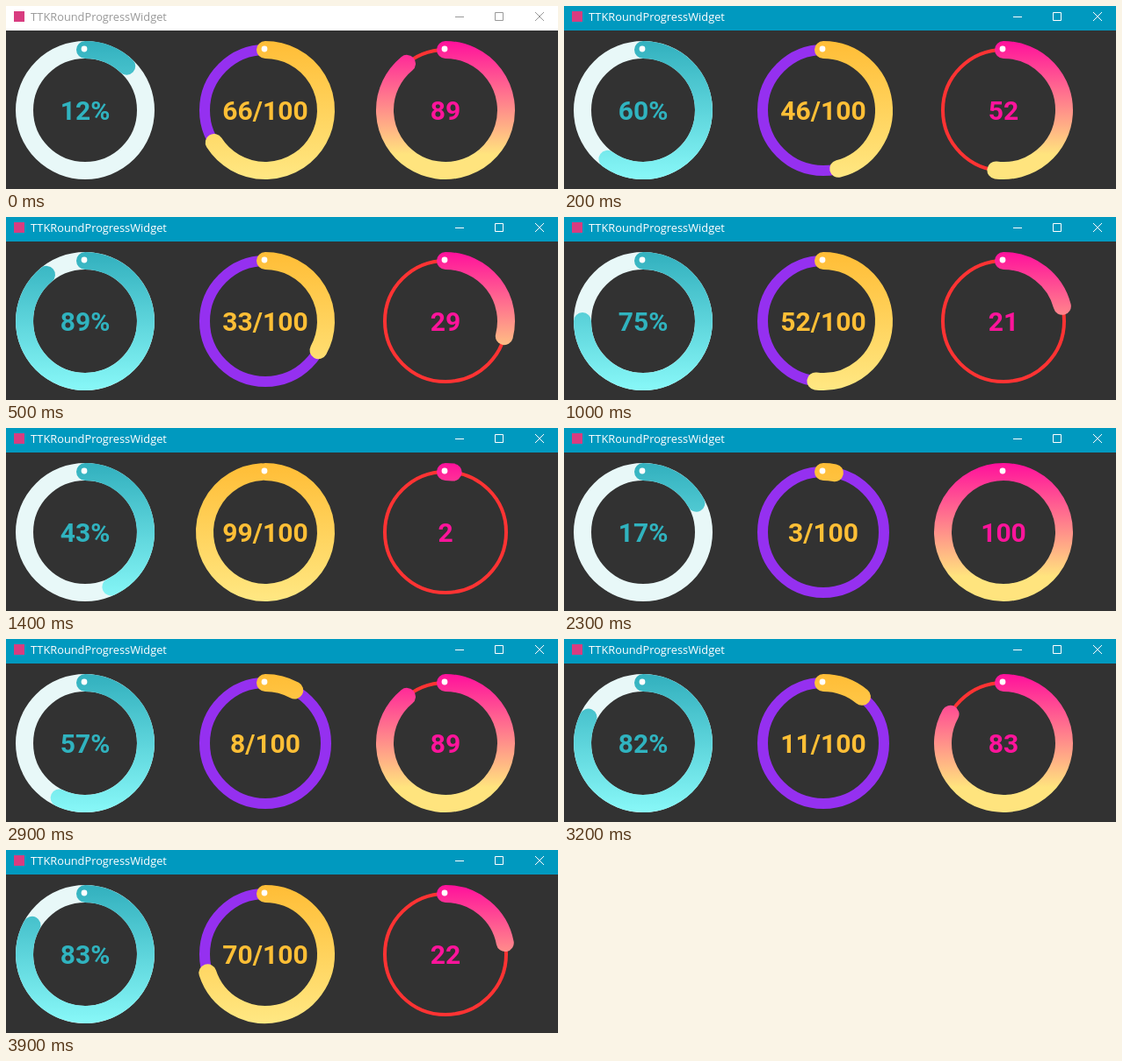
These frames come from a looping animation (628x209 px, 4000 ms). An HTML page:

```html
<!DOCTYPE html>
<html lang="en">
<head>
<meta charset="utf-8">
<title>Round progress</title>
<style>
  html, body { margin: 0; width: 100%; height: 100%; overflow: hidden; background: #323232; }
  svg { display: block; }
  .title { font: 12.8px "Open Sans", "Noto Sans", sans-serif; }
  .value { font: 700 30px Roboto, sans-serif; text-anchor: middle; }
</style>
</head>
<body>
<svg id="stage" width="628" height="209" viewBox="0 0 628 209">
  <rect width="628" height="209" fill="#323232"/>
  <rect id="bar" width="628" height="28"/>
  <rect x="9" y="6" width="12" height="12" fill="#d83c80"/>
  <text id="title" class="title" x="28" y="17">TTKRoundProgressWidget</text>
  <g id="buttons" fill="none">
    <path d="M511 12.5h10M556.5 7.5h9v9h-9z"/>
    <path d="M602 7l10 10M612 7l-10 10"/>
  </g>
</svg>
<script>
const LOOP = 4000, STEP = 100, PERIOD = 900, RADIUS = 69, CY = 119;
const stage = document.getElementById('stage');
const bar = document.getElementById('bar');
const title = document.getElementById('title');
const buttons = document.getElementById('buttons');

// Values each dial rests at, one row per period
const rests = [[12, 66, 89], [89, 33, 29], [43, 99, 2], [17, 3, 100], [82, 11, 83], [83, 81, 11]];

function add(tag, attrs, parent = stage) {
  const node = document.createElementNS('http://www.w3.org/2000/svg', tag);
  for (const key in attrs) node.setAttribute(key, attrs[key]);
  return parent.appendChild(node);
}

function makeDial(cx, track, width, color, stops, id) {
  const grad = add('linearGradient', {
    id, gradientUnits: 'userSpaceOnUse', x1: 0, y1: 40, x2: 0, y2: 198
  });
  for (const [offset, tint] of stops) add('stop', { offset, 'stop-color': tint }, grad);
  add('circle', { cx, cy: CY, r: RADIUS, fill: 'none', stroke: track, 'stroke-width': width });
  const arc = add('path', {
    fill: 'none', stroke: `url(#${id})`, 'stroke-width': 20, 'stroke-linecap': 'round'
  });
  add('circle', { cx: cx - 1, cy: 49, r: 3.4, fill: '#fff' });
  const label = add('text', { class: 'value', x: cx, y: 130, fill: color });
  return { cx, arc, label };
}

const dials = [
  makeDial(90, '#e8f8f8', 20, '#30b3bf', [[0, '#32b0be'], [1, '#88f8f8']], 'teal'),
  makeDial(295, '#9530f0', 12, '#ffbf36', [[0, '#ffbd36'], [1, '#ffe883']], 'gold'),
  makeDial(500, '#ff3333', 4, '#ff149b', [[0, '#ff109c'], [0.82, '#ffe47e']], 'pink')
];
const suffixes = ['%', '/100', ''];

function setDial(dial, value, suffix) {
  const angle = Math.min(value, 99.99) / 100 * 2 * Math.PI;
  const x = dial.cx + RADIUS * Math.sin(angle);
  const y = CY - RADIUS * Math.cos(angle);
  dial.arc.setAttribute('d',
    `M${dial.cx} ${CY - RADIUS}A${RADIUS} ${RADIUS} 0 ${value > 50 ? 1 : 0} 1 ${x} ${y}`);
  dial.label.textContent = value + suffix;
}

function draw(time) {
  const tick = Math.floor(time % LOOP / STEP) * STEP;
  const active = tick >= 100;
  bar.setAttribute('fill', active ? '#0099bf' : '#fff');
  title.setAttribute('fill', active ? '#fff' : '#999');
  buttons.setAttribute('stroke', active ? '#fff' : '#999');

  const row = Math.floor((tick - 100 + PERIOD) / PERIOD);
  const phase = (tick - 100 + PERIOD) % PERIOD;
  const t = Math.min(1, 0.16 + phase / 450);
  const ease = 1 - (1 - t) ** 2;
  dials.forEach((dial, i) => {
    const to = rests[row][i];
    const from = row ? rests[row - 1][i] : to;
    setDial(dial, Math.round(from + (to - from) * ease), suffixes[i]);
  });
}

const start = performance.now();
function loop() {
  draw(performance.now() - start);
  requestAnimationFrame(loop);
}
loop();
</script>
</body>
</html>
```
